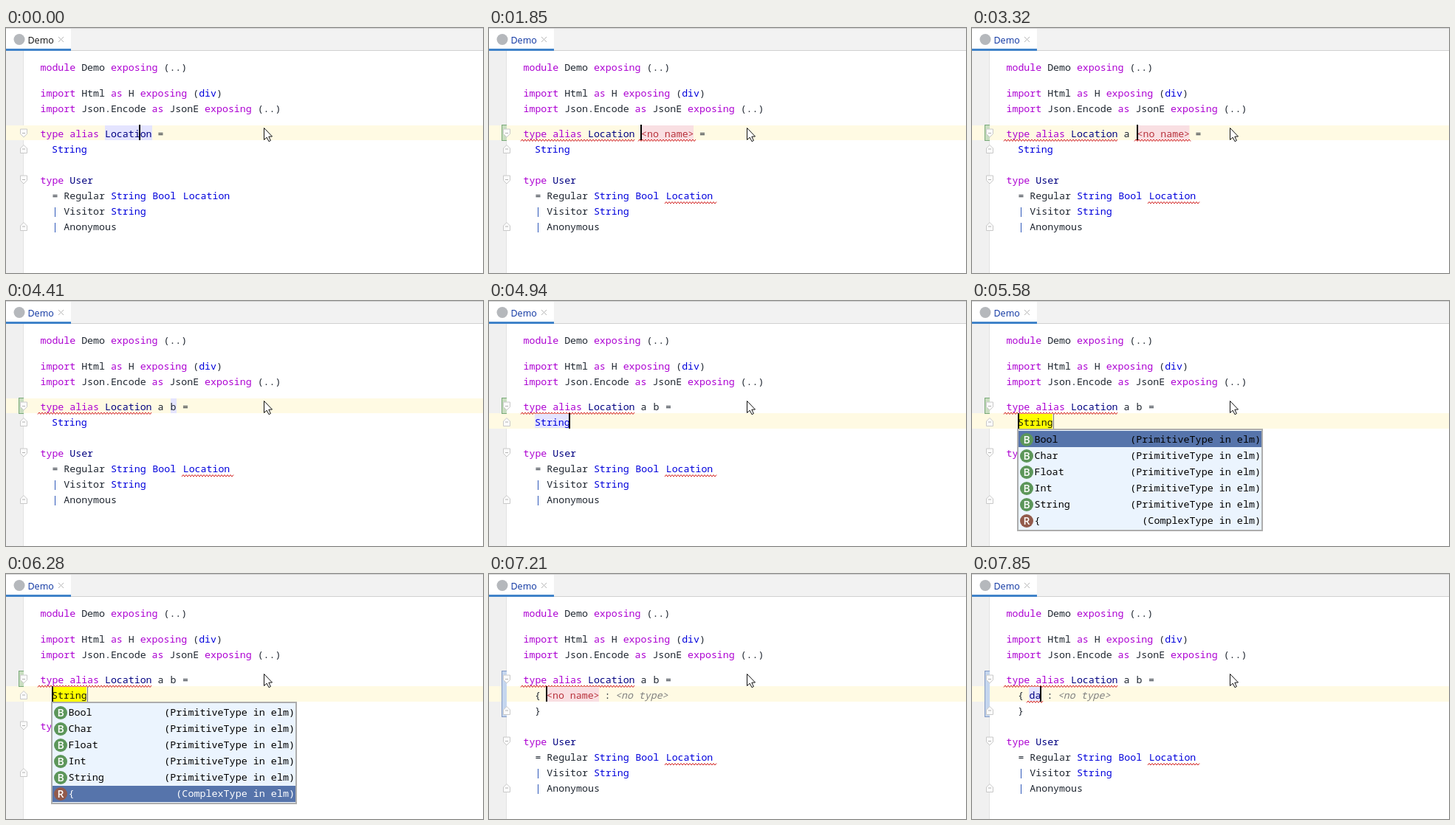
An HTML page with a canvas that plays this animation: 646x332 px, repeating every 8000 ms.

```html
<!DOCTYPE html>
<html lang="en">
<head>
<meta charset="utf-8">
<title>Editor demo</title>
<style>
  html, body { margin: 0; width: 100%; height: 100%; overflow: hidden; background: #fff; }
  canvas { display: block; width: 646px; height: 332px; }
</style>
</head>
<body>
<canvas id="stage" width="646" height="332"></canvas>
<script>
const ctx = document.getElementById('stage').getContext('2d');
const LOOP = 8000;
const MONO = '13.25px "Noto Sans Mono", monospace';
const POPUP_FONT = '13.4px "Noto Sans Mono", monospace';
const UI_FONT = '12.5px "Open Sans", sans-serif';
const C = {
  keyword: '#ad00d2', plain: '#1f2630', decl: '#000080', type: '#0000dc',
  pipe: '#2a55b8', error: '#b8323c', errorBg: '#f9dfe2', hint: '#808080',
  ident: '#e4e4ff', row: '#fffae3', wave: '#d2201f', selected: '#5674ab'
};
const COLS = { k: C.keyword, p: C.plain, d: C.decl, t: C.type, b: C.pipe };
const PITCH = 7.95, LEFT = 46.5;
const ALIAS_Y = 148, BODY_Y = 169;

function rect(x, y, w, h, color) {
  ctx.fillStyle = color;
  ctx.fillRect(x, y, w, h);
}

function text(s, x, y, color, font = MONO) {
  ctx.font = font;
  ctx.fillStyle = color;
  ctx.fillText(s, x, y);
}

function path(points, close) {
  ctx.beginPath();
  points.forEach(([x, y], i) => i ? ctx.lineTo(x, y) : ctx.moveTo(x, y));
  if (close) ctx.closePath();
}

function disc(x, y, r, color) {
  ctx.fillStyle = color;
  ctx.beginPath();
  ctx.arc(x, y, r, 0, Math.PI * 2);
  ctx.fill();
}

// Each token is [kind, text, column]
function line(y, tokens) {
  for (const [kind, s, col] of tokens) text(s, LEFT + col * PITCH, y, COLS[kind]);
}

function wave(x0, x1, y) {
  const points = [];
  for (let x = x0, i = 0; x <= x1; x += 2, i++) points.push([x, y + (i % 2 ? 0.5 : 3)]);
  path(points);
  ctx.strokeStyle = C.wave;
  ctx.lineWidth = 1;
  ctx.stroke();
}

function caret(x, top) {
  rect(x - 1, top, 2, 21, '#000');
}

function slot(x, y) {
  rect(x, y - 16, 71, 20, C.errorBg);
  text('<no name>', x, y, C.error);
}

function foldMark(y, up) {
  const d = up ? -1 : 1;
  path([[19.5, y - 5.5 * d], [28.5, y - 5.5 * d], [28.5, y + 1 * d], [24, y + 5.5 * d], [19.5, y + 1 * d]], true);
  ctx.fillStyle = '#fafafa';
  ctx.fill();
  ctx.strokeStyle = '#c9c9c9';
  ctx.lineWidth = 1;
  ctx.stroke();
  rect(22, y - 0.5, 4, 1, '#b4b4b4');
}

function changeBar(h, fill, edge) {
  rect(17, 131, 7, h, edge);
  rect(18, 132, 6, h - 2, fill);
}

function tabBar(modified) {
  rect(0, 0, 646, 31, '#f2f2f2');
  rect(0, 0, 646, 1, '#d2d2d2');
  rect(0, 30, 646, 1, '#d1d1d1');
  rect(0, 1, 88, 27, '#fff');
  rect(0, 28, 88, 3, '#4083c9');
  disc(18, 15.5, 7.5, '#b5b8bc');
  text('Demo', 29.5, 20.5, modified ? '#0a32a0' : '#111', UI_FONT);
  ctx.strokeStyle = '#b5b5b5';
  ctx.lineWidth = 1;
  for (const d of [-1, 1]) {
    path([[71, 15.5 - 3.5 * d], [78, 15.5 + 3.5 * d]]);
    ctx.stroke();
  }
}

function pointer() {
  path([[349.5, 135.5], [349.5, 151.5], [353.2, 148.2], [356, 153.7],
        [358.4, 152.5], [355.8, 147.2], [360.5, 147]], true);
  ctx.fillStyle = '#fff';
  ctx.fill();
  ctx.strokeStyle = '#111';
  ctx.lineWidth = 1;
  ctx.stroke();
}

function header() {
  line(58, [['k', 'module', 0], ['p', 'Demo', 7], ['k', 'exposing', 12], ['p', '(..)', 21]]);
  line(93, [['k', 'import', 0], ['p', 'Html', 7], ['k', 'as', 12], ['p', 'H', 15],
            ['k', 'exposing', 17], ['p', '(', 26], ['t', 'div', 27], ['p', ')', 30]]);
  line(114, [['k', 'import', 0], ['p', 'Json.Encode', 7], ['k', 'as', 19], ['p', 'JsonE', 22],
             ['k', 'exposing', 28], ['p', '(..)', 37]]);
}

function userType(dy, marked) {
  line(211 + dy, [['k', 'type', 0], ['d', 'User', 5]]);
  line(232 + dy, [['p', '=', 2], ['p', 'Regular', 4], ['t', 'String', 12], ['t', 'Bool', 19.1], ['t', 'Location', 24.3]]);
  line(253 + dy, [['b', '|', 2], ['p', 'Visitor', 4], ['t', 'String', 12]]);
  line(274 + dy, [['b', '|', 2], ['p', 'Anonymous', 4]]);
  if (marked) wave(238, 309, 235 + dy);
}

// Declaration line: arguments, empty slot, errors and caret
function aliasLine(t) {
  const put = (s, x, color = C.plain) => text(s, x, ALIAS_Y, color);
  if (t < 1620) rect(134, 132, 64, 20, C.ident);
  if (t >= 2080 && t < 3170) rect(205, 132, 8, 20, C.ident);
  if (t >= 3930 && t < 4940) rect(223, 132, 8, 20, C.ident);
  line(ALIAS_Y, [['k', 'type', 0], ['k', 'alias', 5], ['d', 'Location', 11]]);
  if (t >= 1850) wave(43, 198, 150.5);
  if (t >= 2080) put('a', 205.5);
  if (t >= 3930) put('b', 222.5);

  if (t < 1620) put('=', 205.5);
  else if (t < 2080) {
    slot(206, ALIAS_Y);
    put('=', 285);
    if (t >= 1850) wave(202, 280, 150.5);
  } else if (t < 3170) {
    put('=', 222.5);
    if (t < 2230) wave(202, 216, 150.5);
  } else if (t < 3930) {
    slot(223.5, ALIAS_Y);
    put('=', 302.5);
    if (t >= 3320) wave(220, 296, 150.5);
  } else {
    put('=', 239);
    if (t < 4240) wave(220, 234, 150.5);
  }

  const stops = [[0, 181], [460, 190], [610, 198], [1470, 0], [1620, 206], [2080, 213],
                 [2940, 0], [3170, 224], [3930, 231], [4410, 0]];
  const x = stops.filter(s => t >= s[0]).pop()[1];
  if (x && t < 4940) caret(x, 131);
}

function bodyLine(t) {
  const put = (s, x, color = C.plain, font = MONO) => text(s, x, BODY_Y, color, font);
  if (t < 7210) {
    const filling = t >= 5410;
    if (filling) {
      rect(62, 153, 47, 20, '#ffff00');
      rect(110, 153, 1, 20, '#777');
    } else if (t >= 4940) rect(62, 153, 47, 19, C.ident);
    put('String', 62, filling ? '#20200a' : C.type);
    if (t >= 4940) caret(filling ? 63 : 109, 152);
    return;
  }
  const typed = t < 7760 ? '' : t < 7850 ? 'd' : 'da';
  const end = 78 + (typed ? typed.length * PITCH : 71);
  put('{', 62);
  if (typed) {
    rect(77, 153, end - 77, 19, C.ident);
    put(typed, 77.5, C.decl);
  } else slot(78, BODY_Y);
  put(':', end + 7.5);
  put('<no type>', end + 22, C.hint, 'italic ' + MONO);
  if (typed || t >= 7360) wave(74, end + 3, 171.5);
  caret(typed ? end - 0.9 : 78, 152);
  text('}', 62, 190, C.plain);
}

function popup(t) {
  const names = ['Bool', 'Char', 'Float', 'Int', 'String', '{'];
  const count = t < 5580 ? 1 : names.length;
  const moved = t >= 6280;
  const chosen = moved ? names.length - 1 : 0;
  rect(61, 173, 333, 7 + 22 * count, '#adadad');
  rect(63, 175, 329, 3 + 22 * count, '#ebf4fe');
  rect(63, Math.floor(176 + 22.2 * chosen), 329, 22, C.selected);
  names.slice(0, count).forEach((name, i) => {
    const y = 176.5 + 22 * i;
    const record = name === '{';
    const color = moved && i === chosen ? '#fff' : '#000';
    disc(74, y + 11.5, 9, record ? '#925a4b' : '#5c965a');
    ctx.textAlign = 'center';
    text(record ? 'R' : 'B', 74, y + 16.5, '#fff', '600 14px "Open Sans", sans-serif');
    ctx.textAlign = 'left';
    text(name, 84.5, y + 15.5, color, POPUP_FONT);
    ctx.textAlign = 'right';
    text(record ? '(ComplexType in elm)' : '(PrimitiveType in elm)', 391, y + 15.5, color, POPUP_FONT);
    ctx.textAlign = 'left';
  });
}

function draw(t) {
  const dy = t >= 7210 ? 21 : 0;
  const edited = t >= 1620;
  rect(0, 0, 646, 332, '#fff');
  tabBar(edited);
  rect(0, 31, 23, 301, '#f0f0f0');
  rect(23, 31, 1, 301, '#e2e2e2');
  if (t < 4940) rect(0, 132, 646, 20, C.row);
  else rect(0, 152, 646, 21, C.row);
  if (dy) changeBar(63, '#c5d6ee', '#8299c4');
  else if (edited) changeBar(22, '#c9dec1', '#79a978');
  foldMark(142.5, false);
  foldMark(164 + dy, true);
  foldMark(205.5 + dy, false);
  foldMark(269 + dy, true);
  header();
  userType(dy, t >= 1850);
  aliasLine(t);
  bodyLine(t);
  if (t >= 5410 && t < 7210) popup(t);
  pointer();
}

const start = performance.now();
function tick() {
  draw((performance.now() - start) % LOOP);
  requestAnimationFrame(tick);
}
tick();
</script>
</body>
</html>
```
